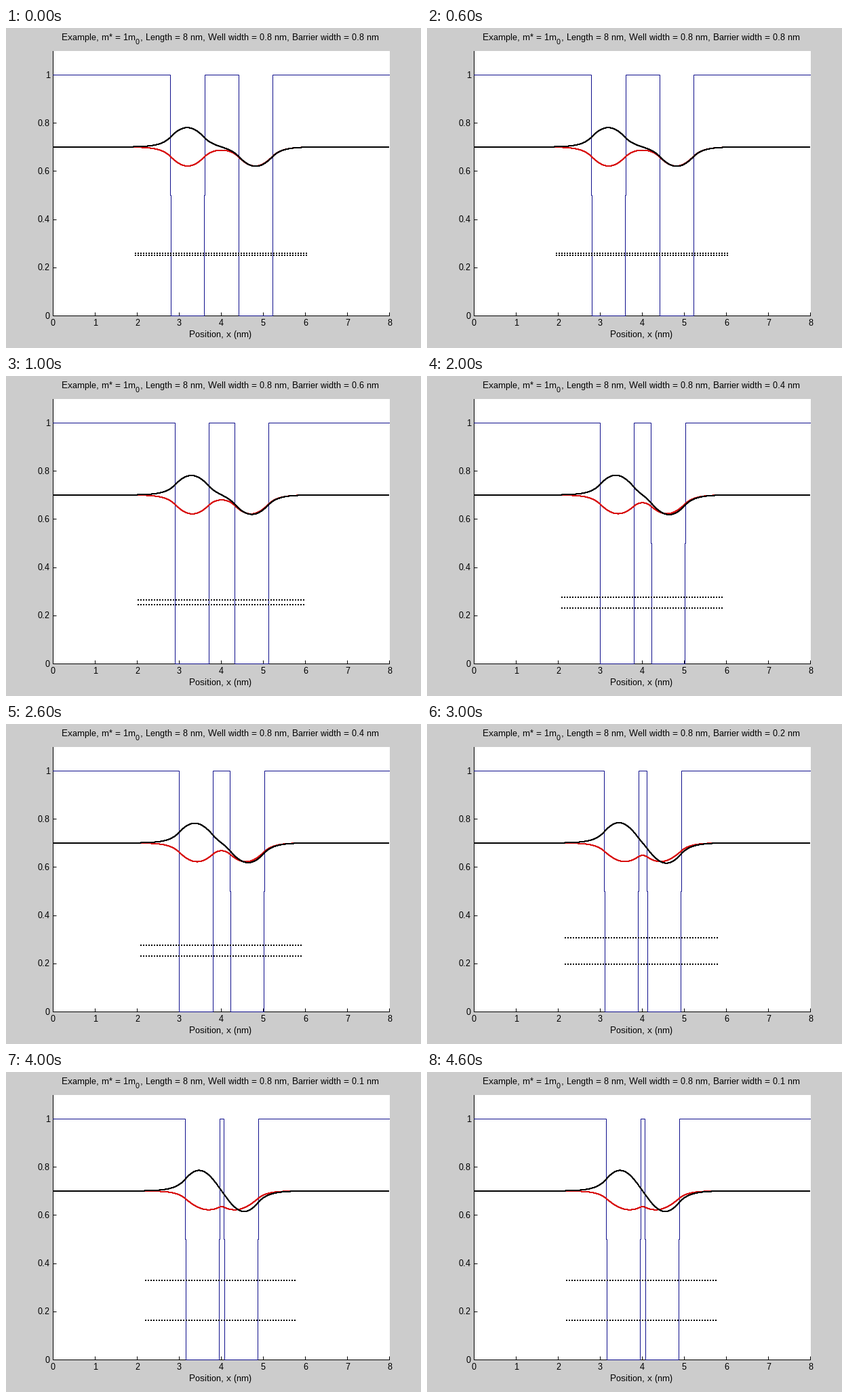
Animation of 612 by 473 pixels, one loop 5000 ms. Source, as a matplotlib script:

```python
from math import ceil

import numpy as np
import matplotlib.pyplot as plt
from matplotlib.animation import FuncAnimation

W, H, DPI = 612, 473, 64
LEFT, BOTTOM, WIDTH, HEIGHT = 69, 48, 496, 391
UNIT = 356  # pixels per eV
LENGTH, WELL, POINTS = 8, 0.8, 1000
BARRIERS = (0.8, 0.6, 0.4, 0.2, 0.1)
STEP = LENGTH / POINTS
KINETIC = 0.0381  # hbar^2 / 2 m0 in eV nm^2
BLUE, RED = "#10108c", "#d81010"

x = np.linspace(0, LENGTH, POINTS)


def px(n):
    """Pixels to points."""
    return n * 72 / DPI


def cells(width):
    return ceil(round(width / STEP, 3))


def left_edge(barrier):
    return (LENGTH - 2 * WELL - barrier) / 2


def find_walls(barrier):
    """Last grid index before each of the four walls."""
    widths = [cells(w) + 1 for w in (WELL, barrier, WELL)]
    return np.cumsum([cells(left_edge(barrier)) - 1] + widths)


def solve(walls):
    """Two lowest energies and wavefunctions of the double well."""
    a, b, c, d = walls
    v = np.ones(POINTS)
    v[a + 1:b + 1] = 0
    v[c + 1:d + 1] = 0
    t = KINETIC / STEP ** 2
    off = np.full(POINTS - 1, -t)
    ham = np.diag(v + 2 * t) + np.diag(off, 1) + np.diag(off, -1)
    energy, psi = np.linalg.eigh(ham)
    even, odd = psi[:, 0], psi[:, 1]
    even = -even * np.sign(even.sum())
    odd = odd * np.sign(odd[(a + b) // 2])
    return energy[:2], even, odd


def outline(walls):
    """Potential with each wall shifted by one grid step at half height."""
    xs, vs = [0], [1]
    for i, wall in enumerate(walls):
        top = 1 - i % 2
        xs += [x[wall], x[wall], x[wall + 1], x[wall + 1]]
        vs += [top, 0.5, 0.5, 1 - top]
    return xs + [LENGTH], vs + [1]


def raised(psi):
    """Wave drawn around 0.7 eV, on whole pixel rows."""
    return np.round((0.7 + psi) * UNIT) / UNIT


all_walls = [find_walls(b) for b in BARRIERS]
solutions = [solve(walls) for walls in all_walls]

plt.rcParams.update({"font.family": "Liberation Sans",
                     "text.hinting": "default",
                     "text.hinting_factor": 1})
fig = plt.figure(figsize=(W / DPI, H / DPI), dpi=DPI, facecolor="#cccccc")
ax = fig.add_axes([LEFT / W, BOTTOM / H, WIDTH / W, HEIGHT / H])
ax.set(xlim=(0, LENGTH), ylim=(0, HEIGHT / UNIT),
       xticks=range(9), yticks=np.arange(6) / 5)
ax.set_axisbelow(True)
ax.tick_params(direction="in", length=px(5), width=px(1),
               labelbottom=False, labelleft=False)
ax.spines["top"].set_visible(False)
ax.spines["right"].set_color("white")
for name, spine in ax.spines.items():
    spine.set(linewidth=px(1), zorder=0.3 if name == "right" else 1)


def label(left, base, text, ha="left", size=13):
    return fig.text(left / W, 1 - base / H, text, ha=ha, va="baseline",
                    fontsize=px(size))


for n in range(9):
    label(69.5 + 62 * n, 440, str(n), "center")
for n in range(6):
    label(65, 429.5 - 71.2 * n, f"{n / 5:g}", "right")
label(316, 457, "Position, x (nm)", "center")
label(82, 18, "Example, m* = 1m")
label(191, 24, "0", size=11)
title = label(198, 18, "")

wave = dict(lw=px(2), solid_joinstyle="miter", zorder=3)
well, = ax.plot([], [], color=BLUE, lw=px(1), clip_on=False,
                solid_joinstyle="miter")
even_line, = ax.plot([], [], color=RED, **wave)
odd_line, = ax.plot([], [], color="black", **wave)
levels = [ax.plot([], [], color="black", lw=px(2), ls=(0, (1, 1)))[0]
          for _ in range(2)]


def draw(frame):
    barrier = BARRIERS[frame]
    energy, even, odd = solutions[frame]
    title.set_text(f", Length = {LENGTH} nm, Well width = {WELL} nm, "
                   f"Barrier width = {barrier} nm")
    well.set_data(*outline(all_walls[frame]))
    even_line.set_data(x, raised(even))
    odd_line.set_data(x, raised(odd))
    start = 0.7 * left_edge(barrier) - LENGTH / WIDTH
    for line, e in zip(levels, energy):
        line.set_data([start, LENGTH - start], [e, e])
    return [title, well, even_line, odd_line, *levels]


anim = FuncAnimation(fig, draw, frames=len(BARRIERS), interval=1000,
                     repeat=True, repeat_delay=0)
plt.show()
```
